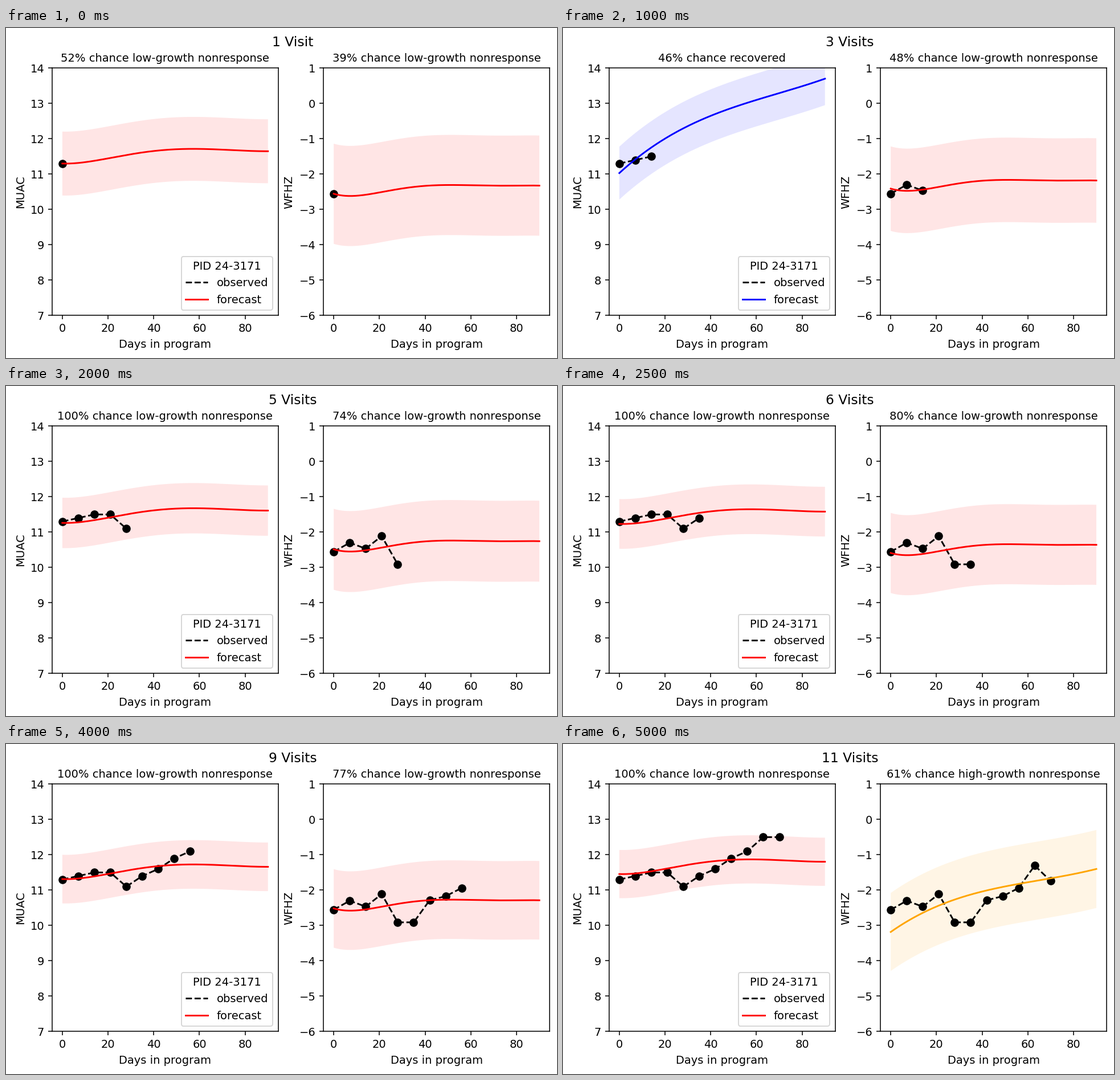
These frames come from a looping animation (967 by 579 pixels, 5500 ms). A matplotlib script:

```python
import matplotlib.pyplot as plt
import numpy as np
from matplotlib.animation import FuncAnimation

W, H, DPI = 967, 579, 140
VISITS = 11
plt.rcParams["font.family"] = "DejaVu Sans"

LOW, HIGH, REC = "low-growth nonresponse", "high-growth nonresponse", "recovered"
COLORS = {LOW: "red", HIGH: "orange", REC: "blue"}

VISIT_DAYS = 7 * np.arange(VISITS)
DAYS = np.linspace(0, 90, 181)


def growth(*gains):
    """Polynomial from zero through evenly spaced gains up to day 90."""
    days = np.linspace(0, 90, len(gains) + 1)
    return np.poly1d(np.polyfit(days, (0, *gains), len(gains)))


class Panel:
    """One measure: observed visits plus a forecast with its interval."""

    def __init__(self, left, name, ylim, observed, curves, noise, chances, outcomes):
        self.observed, self.curves, self.noise = np.array(observed), curves, noise
        self.chances, self.outcomes = chances, outcomes
        self.ax = ax = fig.add_axes([left / W, 1 - 504.4 / H, 397 / W, 434 / H])
        ax.set(xlim=(-4.5, 94.5), ylim=ylim, ylabel=name,
               xticks=range(0, 81, 20), yticks=range(ylim[0], ylim[1] + 1))
        ax.set_xlabel("Days in program", labelpad=4.4)
        self.title = ax.set_title("", fontsize=10)
        self.band, = ax.fill([0, 90, 90], [0, 0, 0], alpha=0.1, lw=0, zorder=0.9)
        self.dots, = ax.plot([], [], "ko", mew=1.5, zorder=1.5)
        self.dashes, = ax.plot([], [], "k--", label="observed")
        self.line, = ax.plot([], [], label="forecast")

    def show(self, n):
        outcome = self.outcomes[n - 1]
        curve, color = self.curves[outcome], COLORS[outcome]
        days, seen = VISIT_DAYS[:n], self.observed[:n]

        # The curve shifts to the mean residual; its interval narrows with n.
        mid = curve(DAYS) + np.mean(seen - curve(days))
        base, extra = self.noise
        half = np.sqrt(base + extra / n)

        self.title.set_text(f"{self.chances[n - 1]}% chance {outcome}")
        self.dots.set_data(days, seen)
        self.dashes.set_data(days, seen)
        self.line.set_data(DAYS, mid)
        self.line.set_color(color)
        self.band.set_facecolor(color)
        self.band.set_xy(np.column_stack([
            np.r_[DAYS, DAYS[::-1]], np.r_[mid + half, mid[::-1] - half]]))
        return color


fig = plt.figure(figsize=(W / DPI, H / DPI), dpi=DPI, facecolor="white")
heading = fig.text(503.3 / W, 1 - 32 / H, "", fontsize=12,
                   ha="center", va="baseline")

muac = Panel(
    80.8, "MUAC", (7, 14),
    observed=[11.3, 11.4, 11.5, 11.5, 11.1, 11.4, 11.6, 11.9, 12.1, 12.5, 12.5],
    curves={LOW: growth(.122, .322, .413, .387, .348),
            REC: growth(1.331, 2.07, 2.671)},
    noise=(.43, .389),
    chances=[52, 53, 46, 68] + [100] * 7,
    outcomes=[LOW] + [REC] * 2 + [LOW] * 8,
)
wfhz = Panel(
    557.1, "WFHZ", (-6, 1),
    observed=[-2.555, -2.3, -2.467, -2.112, -2.911, -2.911,
              -2.285, -2.172, -1.939, -1.305, -1.741],
    curves={LOW: growth(.013, .2, .247, .228, .23),
            REC: growth(.965, 1.51, 1.95, 2.325, 2.728),
            HIGH: growth(.96, 1.407, 1.783)},
    noise=(1.14, .87),
    chances=[39, 44, 48, 45, 74, 80, 83, 82, 77, 52, 61],
    outcomes=[LOW, REC] + [LOW] * 8 + [HIGH],
)
legend = muac.ax.legend(title="PID 24-3171", loc="lower right", labelspacing=0.55)


def update(i):
    n = i + 1
    heading.set_text(f"{n} Visit" + "s" * (n > 1))
    legend.get_lines()[1].set_color(muac.show(n))
    wfhz.show(n)
    return []


anim = FuncAnimation(fig, update, frames=VISITS, interval=500,
                     init_func=lambda: update(0), repeat=True, repeat_delay=0)
plt.show()
```
